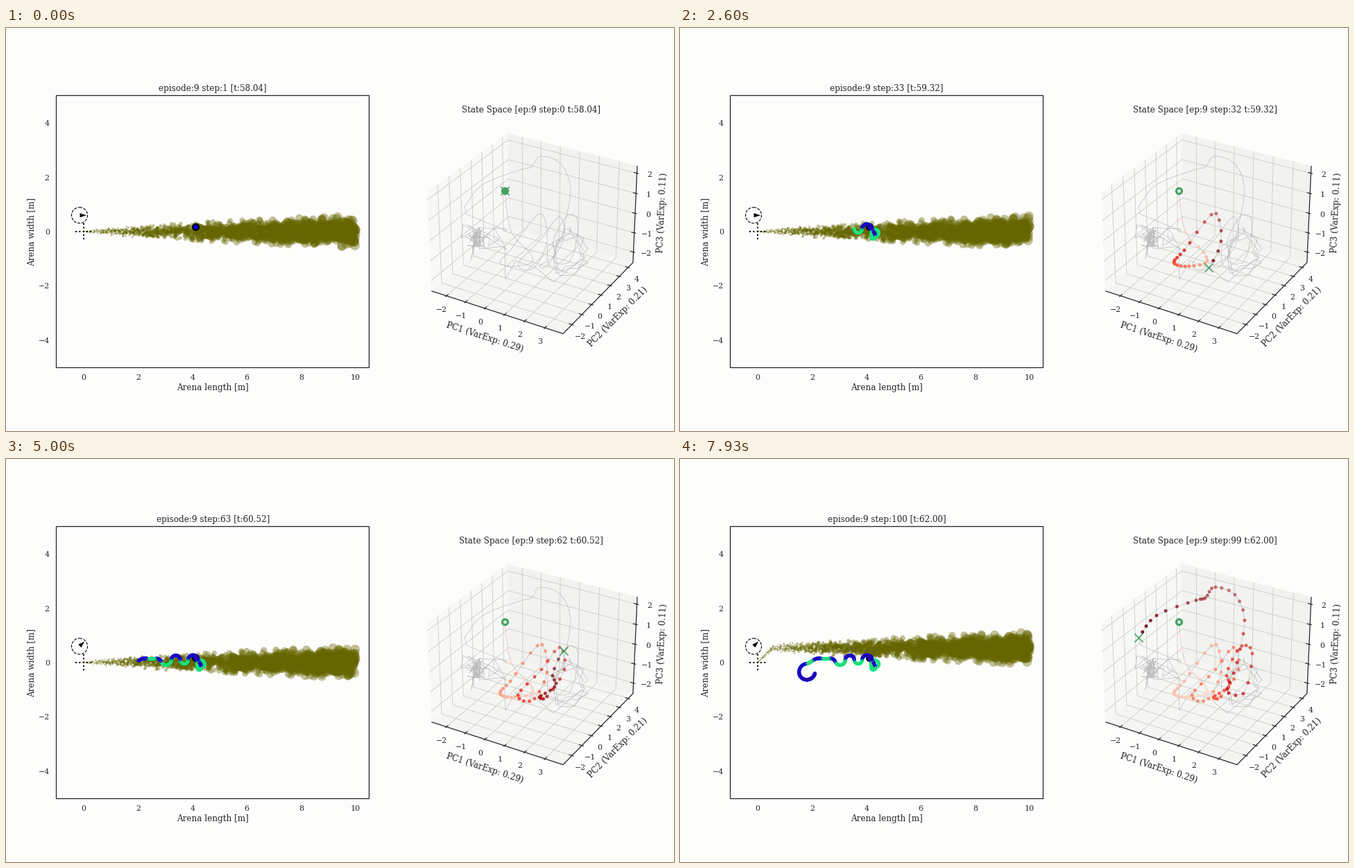
A matplotlib script that plays this animation: 963 px wide and 582 px high, repeating every 8 s.

```python
import numpy as np
import matplotlib.pyplot as plt
from matplotlib.animation import FuncAnimation
from matplotlib.patches import Circle, Polygon, Rectangle

W, H = 963, 582
FRAMES, STEPS, LOOP_MS = 114, 100, 8000
T_START, DT = 58.04, 0.04
INK, BACK, GREEN = "#262626", "#fdfdfc", "#43a260"

plt.rcParams["font.family"] = "DejaVu Serif"
rng = np.random.default_rng(9)

# At 72 dpi one point is one pixel; the canvas uses pixel coordinates, y down.
fig = plt.figure(figsize=(W / 72, H / 72), dpi=72, facecolor=BACK)
ax = fig.add_axes([0, 0, 1, 1])
ax.set_xlim(0, W)
ax.set_ylim(H, 0)
ax.axis("off")


def label(x, y, text, size=12, ha="center", va="baseline", angle=0):
    return ax.text(x, y, text, fontsize=size, color=INK, ha=ha, va=va,
                   rotation=angle, rotation_mode="anchor")


def num(v):
    return str(v).replace("-", "\u2212")


def stroke(points, color=INK, lw=1.0, z=2, **kw):
    xs, ys = np.asarray(points, float).T
    ax.plot(xs, ys, color=color, lw=lw, zorder=z, **kw)


def dots(points, radius, color, z):
    pts = np.asarray(points, float)
    return ax.scatter(pts[:, 0], pts[:, 1], s=(2 * np.asarray(radius)) ** 2,
                      c=color, linewidths=0, zorder=z)


# ---------------------------------------------------------------- arena
UNIT, X0, Y0 = 39.2, 112.0, 294.0
ax.add_patch(Rectangle((72.4, 97), 451, 393, fill=False, ec=INK, lw=1.3, zorder=9))
for v in range(0, 11, 2):
    label(X0 + v * UNIT, 508.4, num(v), 11)
for v in range(-4, 5, 2):
    label(62.8, Y0 - v * UNIT + 4, num(v), 11, "right")
label(298.2, 522.6, "Arena length [m]")
label(40.4, Y0, "Arena width [m]", angle=90)
arena_title = label(298.2, 91.4, "")

# Odour source and wind vane
cross = 0.3 * UNIT
stroke([(X0 - cross, Y0), (X0 + cross, Y0)], "black", 2, 6, ls=":")
stroke([(X0, Y0 - cross), (X0, Y0 + cross)], "black", 2, 6, ls=":")
VANE = np.array([106.0, 270.5])
HEAD = np.array([(0.5, -3), (10, 0), (0.5, 3)])
ax.add_patch(Circle(VANE, 11.5, fill=False, ec="black", lw=1.1, ls="--", zorder=6))
vane = Polygon(VANE + HEAD, fc="black", ec="none", zorder=6)
ax.add_patch(vane)

# Puffs drift with the wind, which turns by 45 degrees at T_TURN
SPEED, T_TURN, PUFFS = 0.5, 60.5, 2150
born = np.sort(rng.uniform(T_START - 21, T_START + 4, PUFFS))
side = np.clip(rng.normal(0, 1, PUFFS), -2.5, 2.5)
puffs = dots(np.zeros((PUFFS, 2)), np.ones(PUFFS), "#666600", 3)
puffs.set_alpha(0.4)


def blow(t):
    age = t - born
    after = np.clip(t - np.maximum(born, T_TURN), 0, None)
    slant = SPEED * np.sqrt(0.5)
    x = SPEED * (age - after) + slant * after
    live = (age > 0) & (x < 10)
    x = x[live]
    y = slant * after[live] + side[live] * 0.225 * (age[live] / 20) ** 0.58
    puffs.set_offsets(np.column_stack([X0 + x * UNIT, Y0 - y * UNIT]))
    puffs.set_sizes((2 * (0.45 + 0.66 * x)) ** 2)


# The walker moves along arcs: (steps, length, turn in degrees, in odour)
SUB = 3
ARCS = [(5, 12.5, 0, 0), (3, 11, -153, 1), (5, 17, -180, 1), (1, 5, 0, 1),
        (3, 11.5, -205, 1), (3, 14, 0, 0), (7, 19, -155, 0), (5, 17.6, 180, 1),
        (9, 20.4, -180, 0), (7, 20.8, 160, 1), (3, 10, -80, 0), (5, 13, 20, 1),
        (6, 12.5, -50, 0), (7, 10.5, 30, 1), (5, 17.2, -80, 0),
        (8, 17.3, -90, 0), (17, 16, -75, 0)]


def walk_path(start, heading):
    count = np.array([a[0] * SUB for a in ARCS])
    length, turn, odour = (np.repeat([a[k] for a in ARCS], count) for k in (1, 2, 3))
    count = np.repeat(count, count)
    bend = np.radians(turn / count)
    h = np.radians(heading) + np.cumsum(bend) - bend / 2
    move = np.column_stack([np.cos(h), np.sin(h)]) * (length / count)[:, None]
    path = np.vstack([start, start + np.cumsum(move, axis=0)])
    return path, np.append(0, odour).astype(bool)


walk, in_odour = walk_path(np.array([273.0, 287.0]), 63)
body_color = np.where(in_odour, "#00e878", "#1000d8")
core_color = np.where(in_odour, "#9db39a", "#3c0a68")
dots(walk[:1], 5.6, "black", 4)
dots(walk[:1], 3.3, "#0000e0", 4.1)
body = dots(walk[:1], 2.6, "#1000d8", 5)
core = dots(walk[:1], 0.8, "#3c0a68", 5.1)

# ---------------------------------------------------------------- state space
LIMITS = np.array([(-2.77, 3.88), (-2.88, 4.55), (-2.55, 2.34)])
BOX = np.array([4, 4, 3]) / 3.5
AZIM, ELEV = np.radians([-60, 30])
RIGHT = np.array([-np.sin(AZIM), np.cos(AZIM), 0])
NEAR = np.array([np.cos(ELEV) * np.cos(AZIM), np.cos(ELEV) * np.sin(AZIM),
                 np.sin(ELEV)])
UP = np.cross(NEAR, RIGHT)


def project(p):
    c = (np.asarray(p, float) - 0.5) * BOX
    scale = 1896 / (10 - c @ NEAR)
    return np.column_stack([761.5 + scale * (c @ RIGHT), 290.1 - scale * (c @ UP)])


def place(axis, v, x=0, y=0, z=0):
    p = [x, y, z]
    lo, hi = LIMITS[axis]
    p[axis] = (v - lo) / (hi - lo)
    return p


PANES = [([(0, 0, 0), (0, 1, 0), (0, 1, 1), (0, 0, 1)], "#f8f8f6"),
         ([(0, 1, 0), (1, 1, 0), (1, 1, 1), (0, 1, 1)], "#f2f2f0"),
         ([(0, 0, 0), (1, 0, 0), (1, 1, 0), (0, 1, 0)], "#f5f5f3")]
for corners, shade in PANES:
    ax.add_patch(Polygon(project(corners), fc=shade, ec=shade, lw=0.8, zorder=1))

# Per axis: ticks, corners of the grid line (axis edge first), tick way, label shift
AXES = [(range(-2, 4), [dict(y=0), dict(y=1), dict(y=1, z=1)], (0, -1, 0), (-6.9, 19)),
        (range(-2, 5), [dict(x=1), dict(x=0), dict(x=0, z=1)], (1, 0, 0), (12, 16.4)),
        (range(-2, 3), [dict(x=1, y=1), dict(y=1), dict()], (1, 0, 0), (18.3, 1.5))]
for k, (ticks, corners, way, shift) in enumerate(AXES):
    for v in ticks:
        grid = np.array([place(k, v, **c) for c in corners])
        stroke(project(grid), "#cdcdc9", 0.9, 1.5)
        out = np.array(way)
        stroke(project([grid[0] - out * 0.02, grid[0] + out * 0.01]), INK, 1.2)
        x, y = project(grid[:1])[0] + shift
        label(x, y + 4, num(v), 11)
stroke(project([(0, 0, 0), (1, 0, 0), (1, 1, 0), (1, 1, 1)]), INK, 1.25)

label(690, 447, "PC1 (VarExp: 0.29)", va="center", angle=-17.9)
label(882.5, 417, "PC2 (VarExp: 0.21)", va="center", angle=45.4)
label(946, 267, "PC3 (VarExp: 0.11)", va="center", angle=87.5)
state_title = label(757, 122, "")

# Turning points of the state path: (step, x, y)
KEYS = [(0, 719, 235), (3, 728, 294), (6, 755, 324), (8, 760, 336),
        (12, 734, 344), (17, 712, 338), (21, 727, 321), (26, 773, 268),
        (29, 780, 308), (32, 762, 346), (36, 738, 341), (40, 772, 304),
        (43, 798, 272), (46, 805, 304), (49, 780, 343), (52, 769, 344),
        (57, 793, 324), (59, 788, 313), (63, 810, 270), (66, 825, 281),
        (69, 812, 339), (71, 791, 338), (75, 803, 294), (78, 814, 233),
        (81, 800, 196), (84, 772, 185), (88, 757, 201), (91, 744, 204),
        (95, 687, 226), (99, 661, 258)]


def smooth(keys, at):
    """Cubic Hermite curve through the keys."""
    keys = np.array(keys, float)
    when, pos = keys[:, 0], keys[:, 1:]
    slope = np.gradient(pos, when, axis=0)
    i = np.clip(np.searchsorted(when, at, "right") - 1, 0, len(when) - 2)
    span = (when[i + 1] - when[i])[:, None]
    u = (at - when[i])[:, None] / span
    ease = u * u * (3 - 2 * u)
    return (pos[i] * (1 - ease) + pos[i + 1] * ease
            + span * u * (1 - u) * (slope[i] * (1 - u) - slope[i + 1] * u))


state = smooth(KEYS, np.arange(STEPS))

# The rest of the episode: a tight nest on the left, loose loops on the right
nest = rng.normal((679, 305), (5, 9), (48, 2))
web = rng.uniform((653, 283), (722, 322), (18, 2))
turn = np.linspace(0, 6 * np.pi, 44) + rng.normal(0, 0.2, 44)
wide = rng.uniform(0.5, 1.05, 44)
loops = np.column_stack([809 + 31 * wide * np.cos(turn),
                         325 + 36 * wide * np.sin(turn)])
link = [(719, 318), (720, 363), (735, 336), (765, 347), (789, 367)]
rest = np.vstack([state[-1:], [(664, 269), (722, 293)], web[:9], nest, web[9:],
                  link, loops])
for path in (state, rest):
    stroke(path, "#b4b4b8", 0.7, 3, alpha=0.85)

dots(state[:1], 5.6, GREEN, 6)
pale = dots(state[:1], 2.5, "#dcebdc", 6.1)
trail = dots(state[:1], 2.5, "red", 5)
mark = ax.scatter([0], [0], s=150, marker="x", c=GREEN, linewidths=1.5, zorder=7)
reds = plt.get_cmap("Reds")
depth = 0.75 * state[:, 0] - state[:, 1]


def trail_colors(n):
    rgba = reds(0.06 + 0.94 * np.arange(n) / max(n - 1, 1))
    if n:
        d = depth[:n]
        rgba[:, 3] = 1 - 0.45 * (d - d.min()) / max(np.ptp(d), 1)
    return rgba


def draw(frame):
    s = frame * STEPS // FRAMES
    t = T_START + DT * s
    arena_title.set_text(f"episode:9 step:{s + 1} [t:{t:.2f}]")
    state_title.set_text(f"State Space [ep:9 step:{s} t:{t:.2f}]")

    blow(t)
    a = -np.pi / 4 if t > T_TURN else 0
    spin = np.array([(np.cos(a), np.sin(a)), (-np.sin(a), np.cos(a))])
    vane.set_xy(VANE + HEAD @ spin)

    for art, colors, every in ((body, body_color, 1), (core, core_color, SUB)):
        shown = slice(0, s * SUB + 1, every)
        art.set_offsets(walk[shown])
        art.set_facecolors(list(colors[shown]))
        art.set_visible(s > 0)

    trail.set_offsets(state[:s])
    trail.set_facecolors(trail_colors(s))
    pale.set_visible(s > 15)
    mark.set_offsets(state[s:s + 1])
    return []


anim = FuncAnimation(fig, draw, frames=FRAMES, init_func=lambda: draw(0),
                     interval=LOOP_MS / FRAMES, repeat=True, repeat_delay=0)
plt.show()
```
